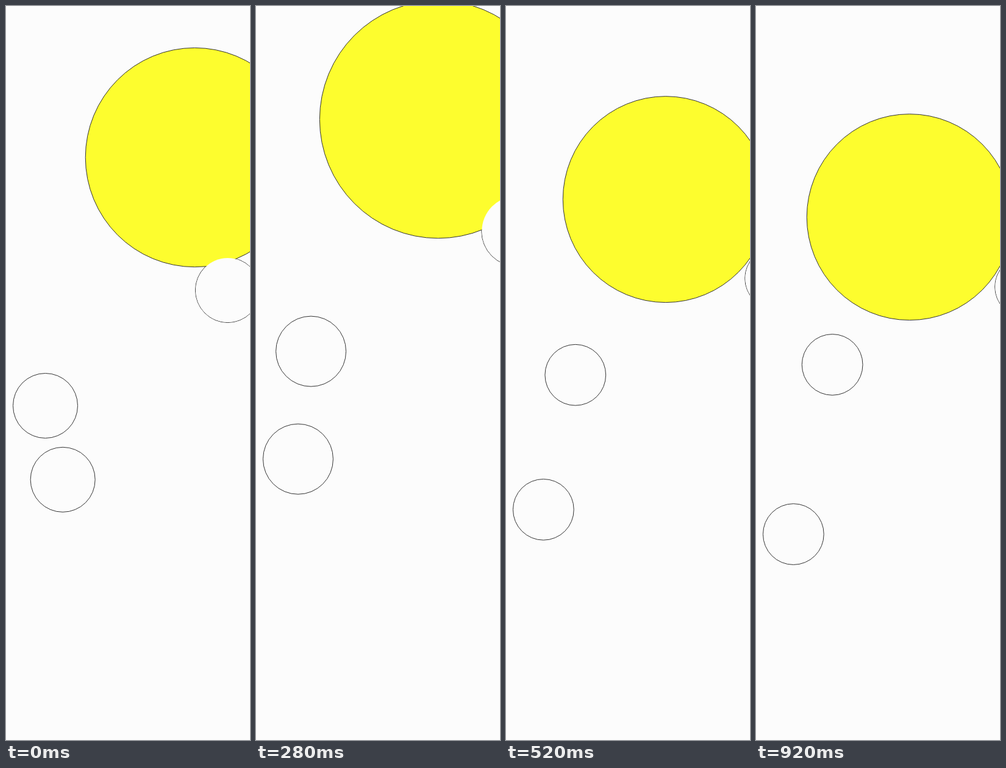
Animation, 400 px wide and 1200 px high, one loop 960 ms. Source, as an HTML page with a canvas:

```html
<!DOCTYPE html>
<html>
<head>
<meta charset="utf-8">
<style>
  html, body { margin: 0; overflow: hidden; background: #fcfcfc; }
  canvas { display: block; }
</style>
</head>
<body>
<canvas width="400" height="1200"></canvas>
<script>
const ctx = document.querySelector('canvas').getContext('2d');
const LOOP = 960, STEP = 40, HIT = 360, SHIFT = 640, END = 920;
const LEFT = 11.5, SMALL = 50, BIG = 169;
const PAPER = '#fcfcfc', SUN = '#fdfd2e', INK = '#333';

const mix = (a, b, e) => a + (b - a) * e;

// Positions of the sun and the low circle are offsets from the upper left circle;
// the right circle rolls around the sun by angle and gap.

// everything closes in while the view zooms in
function approach(t) {
  const p = t / HIT;
  return {
    zoom: 1.06 + 0.00032 * t,
    y: 653.5 - 0.3175 * t,
    sun: [231 - 82 * p ** 2, -383 + 0.19 * t],
    low: [27 - 75 * p ** 2, 114 + 0.14 * t],
    angle: 76 - 45 * p ** 3,
    gap: 211 - 0.06 * t
  };
}

// after the collision the circles only drift, and the view recentres once
function drift(t) {
  const q = (t - HIT) / (END - HIT);
  return {
    zoom: 0.997,
    y: t < SHIFT ? 632 - 0.18 * (t - HIT) : 613 - 0.095 * (t - SHIFT),
    sun: [mix(149, 127, q ** 3), mix(-289, -242, q ** 3)],
    low: [mix(-48, -64, q), mix(180, 278, q ** 0.7)],
    angle: 31 + 6 * Math.sin(Math.PI * q),
    gap: 222
  };
}

function disc([x, y], r, fill, stroke) {
  ctx.beginPath();
  ctx.arc(x, y, r, 0, 2 * Math.PI);
  if (fill) { ctx.fillStyle = fill; ctx.fill(); }
  if (stroke) { ctx.strokeStyle = stroke; ctx.stroke(); }
}

function draw(t) {
  const { zoom, y, sun, low, angle, gap } = t < HIT ? approach(t) : drift(t);
  const r = SMALL * zoom, turn = angle * Math.PI / 180;
  // the leftmost circle always touches the same margin
  const x = LEFT + r - Math.min(0, low[0]) * zoom;
  const place = ([dx, dy]) => [x + dx * zoom, y + dy * zoom];
  const right = place([sun[0] + gap * Math.cos(turn), sun[1] + gap * Math.sin(turn)]);

  ctx.fillStyle = PAPER;
  ctx.fillRect(0, 0, 400, 1200);
  disc(right, r, null, INK);
  disc(place(sun), BIG * zoom, SUN, INK);
  disc(right, r - 0.5, PAPER);
  disc([x, y], r, PAPER, INK);
  disc(place(low), r, PAPER, INK);
}

const start = performance.now();
function frame() {
  const t = (performance.now() - start) % LOOP;
  draw(Math.floor(t / STEP) * STEP);
  requestAnimationFrame(frame);
}
frame();
</script>
</body>
</html>
```
